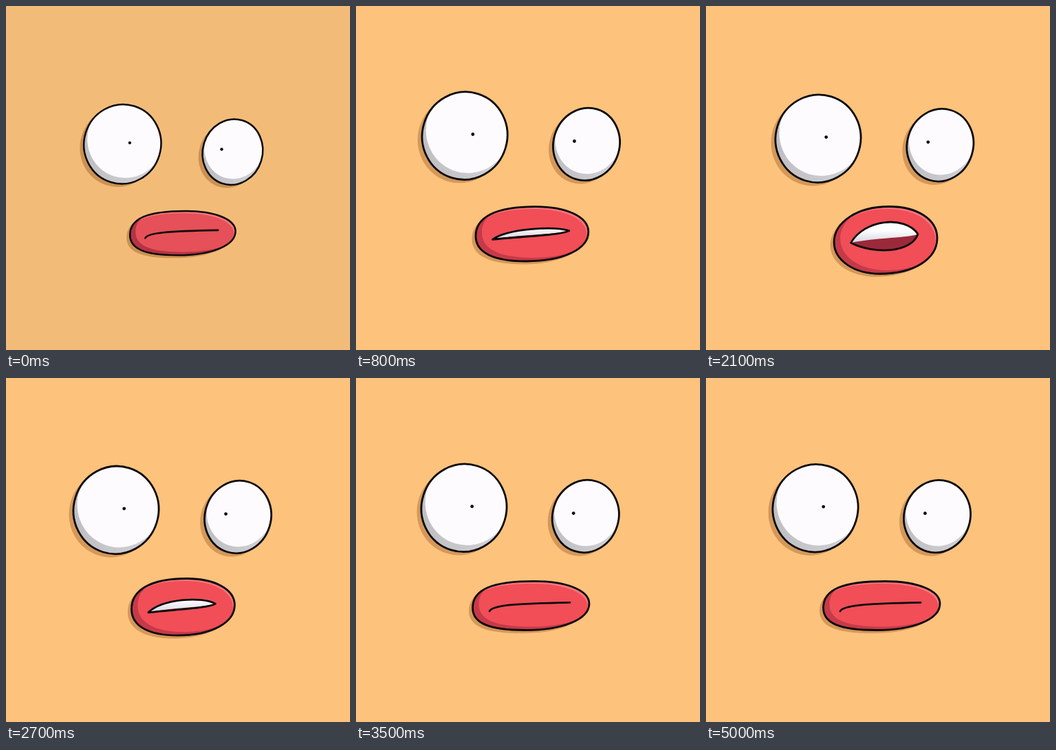
Write an HTML page with a canvas that moves like this. It is 500 px wide and 500 px high and loops after 5100 ms.

```html
<!DOCTYPE html>
<html lang="en">
<head>
<meta charset="utf-8">
<title>Talking face</title>
<style>
html, body { margin: 0; width: 100%; height: 100%; overflow: hidden; background: #fdc27c; }
canvas { display: block; width: 500px; height: 500px; }
</style>
</head>
<body>
<canvas id="stage" width="500" height="500"></canvas>
<script>
const ctx = document.getElementById('stage').getContext('2d');
const LOOP = 5100, STEP = 100, INK = '#0b0809', LINE = 2.8;

// Peak time and strength of each mouth opening
const SYLLABLES = [[980, 0.75], [1550, 0.45], [2100, 0.85], [2530, 1], [3900, 0.85], [4330, 0.5]];

const mix = (a, b, p) => a + (b - a) * p;
const tint = (a, b, p) => `rgb(${a.map((v, i) => Math.round(mix(v, b[i], p)))})`;
const bump = (t, at, width) => Math.exp(-(((t - at) / width) ** 2));

function headSway(t) {
  return {
    x: 5 * bump(t, 2080, 650) - 1.2 * bump(t, 3400, 350) + 1.3 * bump(t, 4700, 600),
    y: 4.8 * bump(t, 2250, 1000) - 1.4 * bump(t, 4000, 350) + 1.2 * bump(t, 5000, 300)
  };
}

function mouthPose(t, sway) {
  const open = SYLLABLES.reduce((sum, [at, size]) => sum + size * bump(t, at, 170), 0);
  const press = bump(t, 1400, 140);
  const pucker = bump(t, 2650, 180);
  return {
    left: 169 + 16 * open + 6 * pucker + sway.x / 2,
    right: 340.5 - 7 * open - 6 * pucker - 3 * press + sway.x / 2,
    top: 294.5 - 4 * Math.min(1, open * 4) + 6 * press,
    bottom: 367.5 + 28 * open ** 1.3 + 3 * press,
    tilt: 1 - 0.55 * press,
    gap: 46 * open,
    roundLeft: 0.69 - 0.14 * Math.min(1, open),
    roundRight: 0.59 + 0.08 * press
  };
}

function fill(path, color, dx = 0, dy = 0, rule = 'nonzero') {
  ctx.save();
  ctx.translate(dx, dy);
  ctx.fillStyle = color;
  ctx.fill(path, rule);
  ctx.restore();
}

function outline(path) {
  ctx.strokeStyle = INK;
  ctx.lineWidth = LINE;
  ctx.stroke(path);
}

function clipped(path, paint) {
  ctx.save();
  ctx.clip(path);
  paint();
  ctx.restore();
}

function oval(x, y, rx, ry, turn = 0) {
  const path = new Path2D();
  path.ellipse(x, y, rx, ry, turn, 0, Math.PI * 2);
  return path;
}

function drawEye(x, y, rx, ry, light, pupilX, pupilY, shadow) {
  const ball = oval(x, y, rx, ry, 0.3);
  fill(ball, shadow, -6.5, 5);
  const shade = ctx.createLinearGradient(x - rx, y, x + rx, y);
  shade.addColorStop(0, '#bfbfc3');
  shade.addColorStop(1, '#d3d3d7');
  fill(ball, shade);
  clipped(ball, () => fill(ball, '#fdfbfe', light, -9.5));
  outline(ball);
  fill(oval(x + pupilX, y + pupilY, 2.4, 2.4), INK);
}

function lipShape({ left, top, right, bottom, tilt, roundLeft, roundRight }) {
  const l = left + 1, t = top + 1, r = right - 1, b = bottom - 1;
  const cx = (l + r) / 2, cy = (t + b) / 2;
  const topX = cx + 5 * tilt, botX = cx - 8 * tilt;
  const leftY = cy + 3 * tilt, rightY = cy - 3 * tilt;
  const path = new Path2D();
  const corner = (x, y, px, py, k, toSide) => {
    const nearSide = [x, mix(y, py, k)], nearPole = [mix(px, x, k), py];
    if (toSide) path.bezierCurveTo(...nearPole, ...nearSide, x, y);
    else path.bezierCurveTo(...nearSide, ...nearPole, px, py);
  };
  path.moveTo(l, leftY);
  corner(l, leftY, topX, t, roundLeft, false);
  corner(r, rightY, topX, t, roundRight, true);
  corner(r, rightY, botX, b, roundRight, false);
  corner(l, leftY, botX, b, roundLeft, true);
  path.closePath();
  return path;
}

function drawOpening({ left, top, right, bottom, tilt, gap }) {
  // A wide gape drops only the lower lip, so the corners stay up.
  const wide = Math.max(0, gap - 18);
  const parted = Math.min(1, gap / 11);
  const cy = (top + bottom) / 2 - wide * 0.2;
  const x0 = left + 25.5, y0 = cy + 8 * tilt;
  const x1 = right - 29, y1 = cy - 4.7 * tilt;
  const along = (closed, open) => mix(x0, x1, mix(closed, open, parted));

  const upper = new Path2D();
  upper.moveTo(x0, y0);
  upper.bezierCurveTo(along(0.03, 0.2), y0 - 8.5 - gap * 0.65,
    along(0.3, 0.8), y1 + 1.5 - gap * 0.75, x1, y1);
  if (gap < 2) return outline(upper);

  const region = (sagRight, sagLeft) => {
    const path = new Path2D(upper);
    path.bezierCurveTo(along(0.3, 0.9), y1 + 1.5 + sagRight,
      along(0.03, 0.35), y0 - 8.5 + sagLeft, x0, y0);
    path.closePath();
    return path;
  };
  const hole = region(5 * parted + wide, 4.5 * parted + wide);
  fill(hole, '#9b2939');
  clipped(hole, () => {
    const enamel = ctx.createLinearGradient(0, cy - 10, 0, cy + 6);
    enamel.addColorStop(0, '#ffffff');
    enamel.addColorStop(1, '#d8dae3');
    fill(region(4 * parted, parted), enamel);
  });
  outline(hole);
}

function drawMouth(pose, bright, shadow) {
  const lips = lipShape(pose);
  fill(lips, shadow, -5.5, 4.5);
  fill(lips, '#f7757b');
  clipped(lips, () => {
    fill(lips, tint([230, 80, 88], [241, 78, 87], bright), -2.5, 3.5);
    const crescent = new Path2D();
    crescent.rect(0, 0, 500, 500);
    crescent.addPath(lips, new DOMMatrix([1, 0, 0, 1, 9, -5]));
    fill(crescent, tint([180, 52, 68], [197, 58, 73], bright), 0, 0, 'evenodd');
  });
  outline(lips);
  drawOpening(pose);
}

function draw(t) {
  const grow = 1 - (1 - Math.min(1, t / 600)) ** 3;
  const sway = headSway(t);
  const shadow = tint([204, 145, 82], [212, 152, 89], grow);

  ctx.fillStyle = tint([242, 188, 120], [253, 194, 124], grow);
  ctx.fillRect(0, 0, 500, 500);
  ctx.lineCap = ctx.lineJoin = 'round';

  ctx.save();
  const size = mix(0.905, 1, grow);
  ctx.translate(277, 322);
  ctx.scale(size, size);
  ctx.translate(-277, -322);
  drawEye(158 + sway.x, 188 + sway.y, 61.8, 63.9, 5.5, 11.7, -2.1, shadow);
  drawEye(334.9 + sway.x * 1.1, 200.7 + sway.y / 3, 48, 53.1, 3, -17.6, -4.4, shadow);
  drawMouth(mouthPose(t, sway), grow, shadow);
  ctx.restore();
}

function tick() {
  const t = performance.now() % LOOP;
  draw(Math.floor(t / STEP) * STEP);
  requestAnimationFrame(tick);
}
tick();
</script>
</body>
</html>
```
